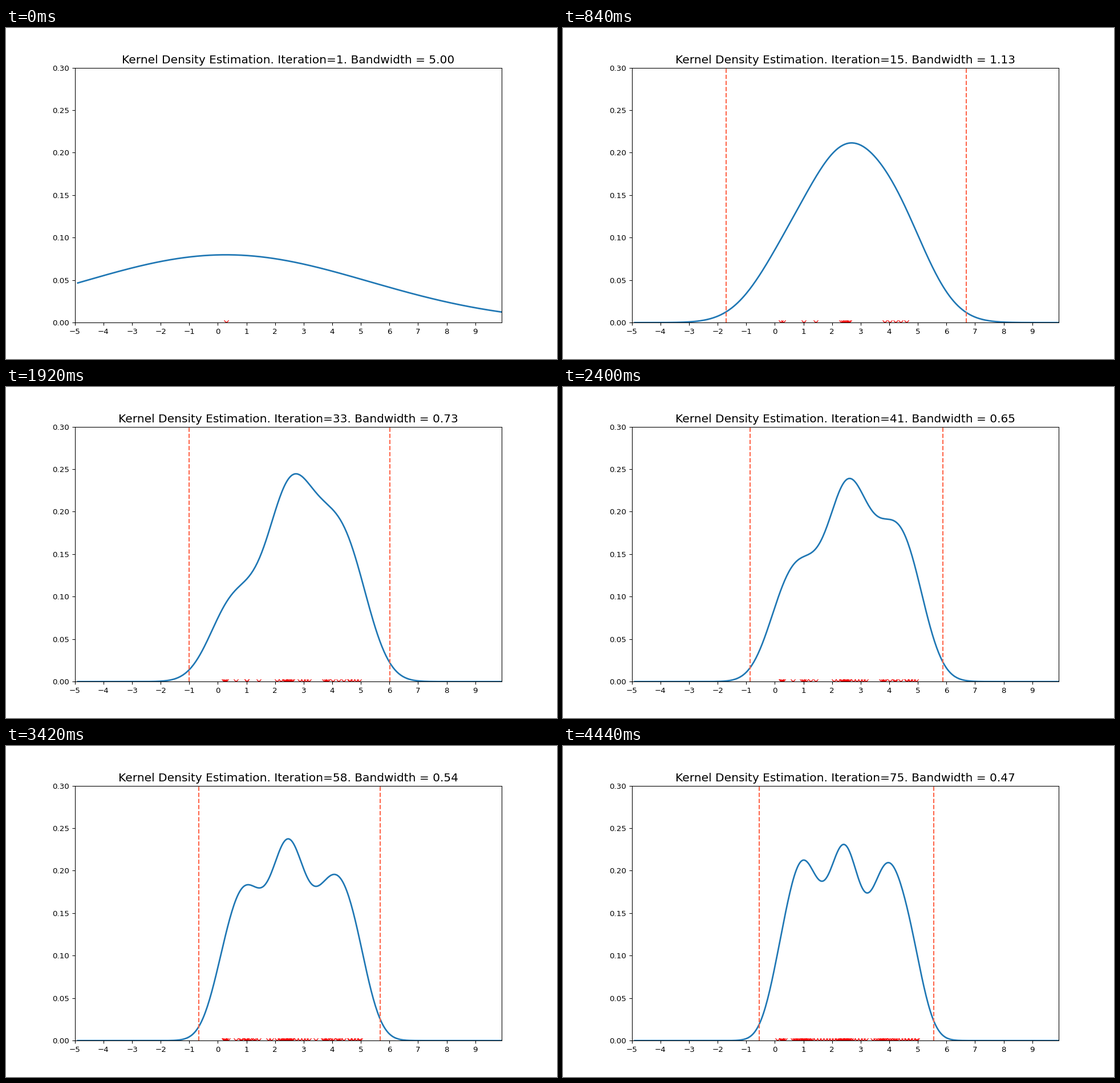
A matplotlib script for the animation above (4500 ms loop, 966x580 px).

```python
import numpy as np
import matplotlib.pyplot as plt
from matplotlib.animation import FuncAnimation

WIDTH, HEIGHT, DPI = 966, 580, 96.6
FRAMES, INTERVAL = 75, 60
STRIDE = 13

# Each phase draws its samples from evenly filled clumps: (low, high, count)
PHASES = [
    [(0.2, 0.28, 2), (1, 1.43, 2), (2.33, 2.61, 6), (3.83, 4.6, 5)],
    [(0.24, 1, 3), (2.06, 2.5, 4), (2.87, 3.18, 4), (3.72, 3.83, 3),
     (4.62, 4.93, 4)],
    [(0.09, 0.35, 3), (0.68, 1.3, 13), (1.55, 1.97, 5), (2.17, 2.75, 7),
     (3.43, 4.27, 11), (4.5, 4.97, 3)],
]

grid = np.linspace(-4.9, 9.93, 400)


def draw_samples(clumps):
    """Fill the clumps, then visit the values in a scattered order."""
    values = np.concatenate([np.linspace(*clump) for clump in clumps])
    order = (1 + STRIDE * np.arange(len(values))) % len(values)
    return values[order]


def bandwidth(n):
    return 5 / n ** 0.55


def density(data, bw):
    z = (grid[:, None] - data) / bw
    return np.exp(-z ** 2 / 2).mean(axis=1) / (bw * np.sqrt(2 * np.pi))


def bounds(bw):
    half = 2.25 + 1.73 * bw
    return 2.5 - half, 2.5 + half


samples = np.concatenate([draw_samples(clumps) for clumps in PHASES])

# The small margin keeps the pixel size from being rounded down
fig, ax = plt.subplots(figsize=((WIDTH + 0.01) / DPI, (HEIGHT + 0.01) / DPI), dpi=DPI)
fig.subplots_adjust(left=0.125, right=0.9, bottom=0.11, top=0.88)
ax.set_xlim(-5, 9.93)
ax.set_ylim(0, 0.3)
ax.set_xticks(np.arange(-5, 10))

curve, = ax.plot([], [], color="C0", lw=2)
points, = ax.plot([], [], "x", color="red", ms=6, mew=1)
edges = [ax.axvline(0, color="tomato", ls="--", lw=1.5) for _ in range(2)]
title = ax.set_title("", fontsize=15)


def update(i):
    n = i + 1
    bw = bandwidth(n)
    data = samples[:n]
    curve.set_data(grid, density(data, bw))
    points.set_data(data, np.zeros(n))
    for edge, x in zip(edges, bounds(bw)):
        edge.set_xdata([x, x])
    title.set_text(f"Kernel Density Estimation. Iteration={n}. Bandwidth = {bw:.2f}")
    return [curve, points, title, *edges]


anim = FuncAnimation(fig, update, frames=FRAMES, interval=INTERVAL,
                     repeat=True, repeat_delay=0, blit=False)
plt.show()
```
